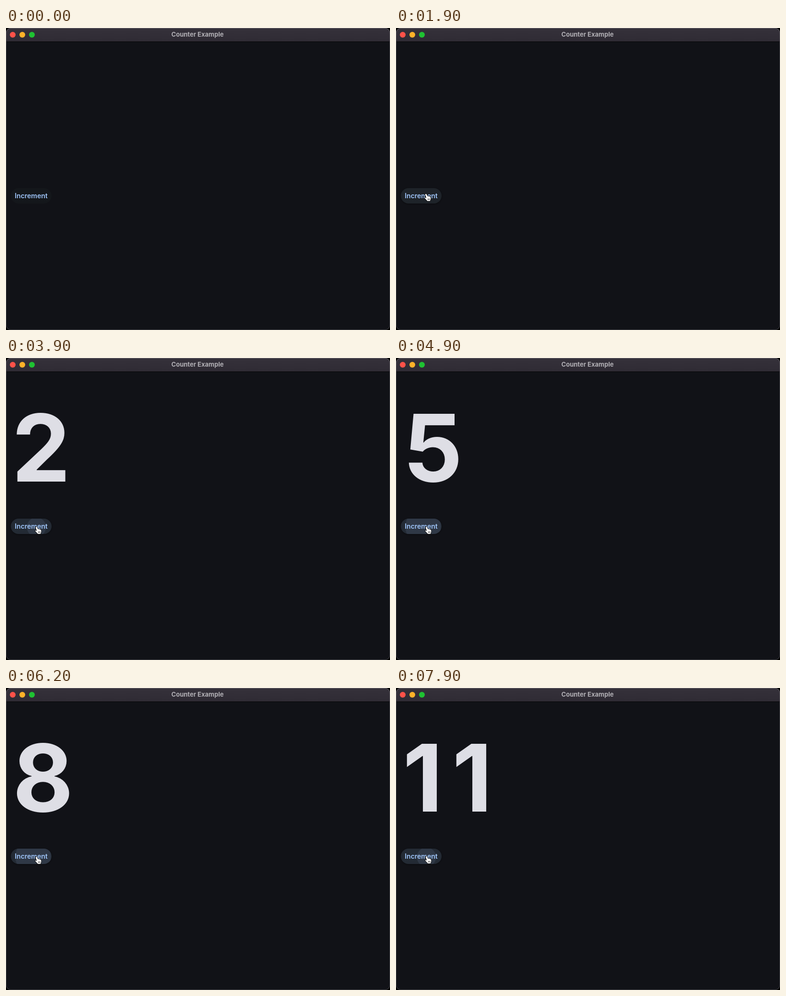
Write an HTML page with a canvas that moves like this. It is 800 px wide and 628 px high and loops after 8 s.

```html
<!DOCTYPE html>
<html lang="en">
<head>
<meta charset="utf-8">
<title>Counter Example</title>
<style>
  html, body { margin: 0; width: 100%; height: 100%; overflow: hidden; background: #000; }
  canvas { display: block; width: 800px; height: 628px; }
</style>
</head>
<body>
<canvas id="stage" width="800" height="628"></canvas>
<script>
const ctx = document.getElementById('stage').getContext('2d');
const LOOP = 8000, STEP = 100;
const FONT = 'Inter, Roboto, "Liberation Sans", sans-serif';

// pointer down and up times; the counter follows each release
const taps = [
  [2480, 2600], [3180, 3300], [3780, 3920], [4320, 4430], [4700, 4810], [5130, 5240],
  [5570, 5680], [6000, 6110], [6280, 6400], [6580, 6700], [6880, 7240], [7780, 8100]
];
const REPLY = 50;

// left ink edge of each digit in the first column
const inkLeft = [22, 22, 22, 22, 20, 26, 23, 24, 22, 22];
const COLUMN = 103;

// cursor hotspot track: time, x, y
const track = [
  [1400, 300, 555], [1500, 205, 462], [1600, 118, 386], [1700, 76, 354],
  [1800, 64, 346], [1900, 62, 345], [2300, 63, 347], [2600, 63, 351], [7700, 63, 351], [7800, 63, 350]
];

const HAND = new Path2D('M2.2 .8C3.2 .3 4 .8 4.4 1.8L6 5.6C6.8 4.8 8 5 8.3 5.8C9.2 5.1 10.3 5.4 10.6 6.3' +
  'C11.6 5.8 12.6 6.5 12.7 7.6L12.9 10.5C12.9 12.5 11.8 13 11.6 15.3L5.6 15.3C5 13.5 2.5 12 .8 9.8' +
  'C0 8.6 1.4 7.6 2.6 8.4L4 9.4L1.4 2.6C1 1.8 1.4 1.1 2.2 .8Z');
const KNUCKLES = new Path2D('M6.9 10.2V13M8.7 10.2V13M10.5 10.2V13');
const ARROW = new Path2D('M0 0V14.5L3.4 11.4L5.6 16.6L8 15.6L5.8 10.5H10.4Z');

const clamp = v => Math.min(1, Math.max(0, v));
const mix = (a, b, k) => a + (b - a) * k;
const easeOut = k => 1 - (1 - k) ** 2;

function pill(x, y, w, h, r) {
  ctx.beginPath();
  ctx.roundRect(x, y, w, h, r);
}

function disc(x, y, r, color) {
  ctx.fillStyle = color;
  ctx.beginPath();
  ctx.arc(x, y, r, 0, Math.PI * 2);
  ctx.fill();
}

function label(text, x, y, font, color, align) {
  ctx.font = font + ' ' + FONT;
  ctx.fillStyle = color;
  ctx.textAlign = align;
  ctx.fillText(text, x, y);
}

function drawWindow() {
  ctx.fillStyle = '#000';
  ctx.fillRect(0, 0, 800, 628);
  ctx.save();
  pill(0, 0, 800, 628, 10);
  ctx.clip();
  ctx.fillStyle = '#111217';
  ctx.fillRect(0, 0, 800, 628);
  const bar = ctx.createLinearGradient(0, 0, 0, 28);
  bar.addColorStop(0, '#35313a');
  bar.addColorStop(1, '#2f2b34');
  ctx.fillStyle = bar;
  ctx.fillRect(0, 0, 800, 28);
  ctx.fillStyle = '#050507';
  ctx.fillRect(0, 28, 800, 1);
  ctx.restore();

  const edge = ctx.createLinearGradient(0, 0, 0, 40);
  edge.addColorStop(0, '#68656c');
  edge.addColorStop(1, '#434347');
  ctx.strokeStyle = edge;
  ctx.lineWidth = 1;
  pill(.5, .5, 799, 627, 9.5);
  ctx.stroke();

  ['#ff5249', '#ffb229', '#1fc232'].forEach((c, i) => disc(14 + 20 * i, 14, 6, c));
  label('Counter Example', 399, 18, '700 13px', '#b2b0b5', 'center');
}

function drawCount(n) {
  if (!n) return;
  ctx.font = '700 194px ' + FONT;
  ctx.fillStyle = '#dedee5';
  ctx.textAlign = 'left';
  [...String(n)].forEach((d, i) => {
    const x = inkLeft[d] + i * COLUMN;
    ctx.fillText(d, x + ctx.measureText(d).actualBoundingBoxLeft, 257);
  });
}

function drawRipple(t, [down, up], top) {
  const age = t - down, after = t - up;
  if (age < 0 || after > 375) return;
  let grow = .3 * easeOut(clamp(Math.min(age, up - down) / 300));
  if (after > 0) grow = mix(grow, 1, easeOut(clamp(after / 225)));
  const alpha = .09 * clamp(age / 75) * (1 - clamp((after - 100) / 275));
  disc(mix(66, 52.5, grow), mix(top + 18, top + 16, grow), mix(13.6, 47, grow),
    `rgba(160,200,250,${alpha})`);
}

function drawButton(t, top) {
  const hover = clamp((t - 1650) / 200);
  const press = Math.max(...taps.map(([down, up]) =>
    clamp((t - down) / 80) * (1 - clamp((t - up - 100) / 200))));
  const tone = [[20, 30, 35], [23, 35, 42], [27, 41, 52]]
    .map(([idle, over, held]) => Math.round(mix(mix(idle, over, hover), held, press)));

  ctx.save();
  ctx.shadowColor = `rgba(0,0,0,${.45 * hover})`;
  ctx.shadowBlur = 3;
  ctx.shadowOffsetY = 1;
  ctx.fillStyle = `rgb(${tone})`;
  pill(10, top, 85, 32, 16);
  ctx.fill();
  ctx.restore();

  ctx.save();
  pill(10, top, 85, 32, 16);
  ctx.clip();
  taps.forEach(tap => drawRipple(t, tap, top));
  ctx.restore();
  label('Increment', 52.5, top + 21, '600 14px', '#9fc5fa', 'center');
}

function cursorAt(t) {
  const i = track.findIndex(p => p[0] > t);
  if (i < 0) return track[track.length - 1].slice(1);
  const a = track[i - 1], b = track[i], k = (t - a[0]) / (b[0] - a[0]);
  return [mix(a[1], b[1], k), mix(a[2], b[2], k)];
}

function drawCursor(t, top) {
  if (t < track[0][0]) return;
  const [x, y] = cursorAt(t);
  const over = x > 10 && x < 95 && y > top && y < top + 32;
  ctx.save();
  ctx.lineJoin = 'round';
  ctx.translate(over ? x - 2.5 : x, over ? y - .5 : y);
  const shape = over ? HAND : ARROW;
  ctx.fillStyle = over ? '#fff' : '#000';
  ctx.strokeStyle = over ? '#000' : '#fff';
  ctx.lineWidth = over ? 1.6 : 1.2;
  ctx.stroke(shape);
  ctx.fill(shape);
  if (over) {
    ctx.lineWidth = .8;
    ctx.stroke(KNUCKLES);
  }
  ctx.restore();
}

function draw(t) {
  const count = taps.filter(([, up]) => t >= up + REPLY).length;
  const top = count ? 334 : 333;
  drawWindow();
  drawCount(count);
  drawButton(t, top);
  drawCursor(t, top);
}

const start = performance.now();
function tick() {
  const t = (performance.now() - start) % LOOP;
  draw(Math.floor(t / STEP) * STEP);
  requestAnimationFrame(tick);
}
tick();
</script>
</body>
</html>
```
